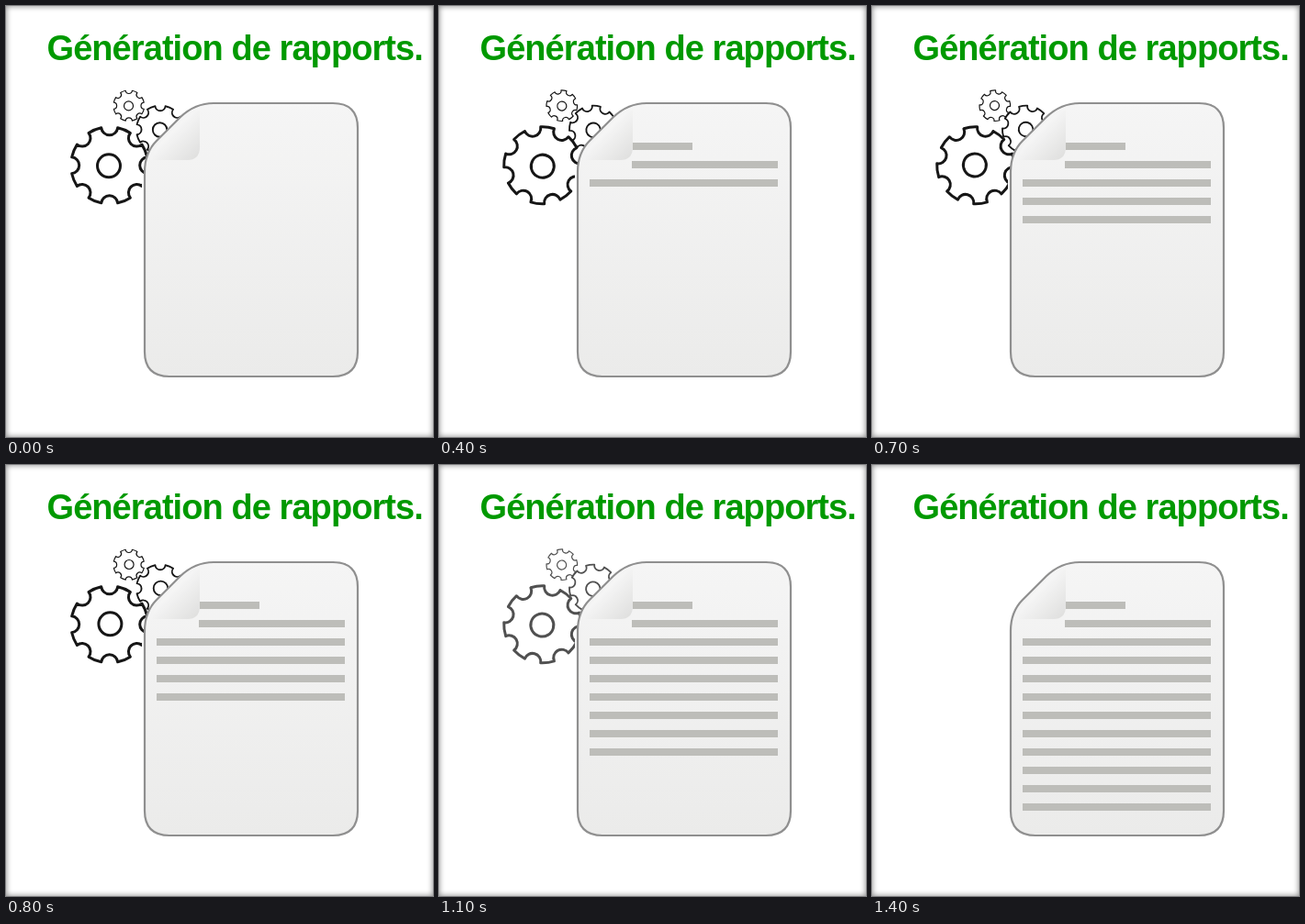
An HTML page for the animation above (1.5 s loop, 465 px wide and 470 px high).

```html
<!DOCTYPE html>
<html lang="fr">
<head>
<meta charset="utf-8">
<title>Génération de rapports</title>
<style>
html, body { margin: 0; width: 100%; height: 100%; overflow: hidden; background: #fff; }
svg { display: block; }
.edge { position: absolute; inset: 0; box-shadow: inset 0 0 6px rgba(0, 0, 0, .5); }
text { font: bold 38px "Liberation Sans", Arial, sans-serif; letter-spacing: -.93px; fill: #090; }
#gears { fill: none; stroke: #161616; stroke-width: 3; stroke-linejoin: round; }
#lines { fill: #bdbdb9; }
</style>
</head>
<body>
<svg width="465" height="470" viewBox="0 0 465 470">
  <defs>
    <linearGradient id="paper" x2="0" y2="1">
      <stop stop-color="#f5f5f5"/><stop offset="1" stop-color="#ebebea"/>
    </linearGradient>
    <linearGradient id="fold" gradientUnits="userSpaceOnUse" x1="176" y1="135" x2="208" y2="167">
      <stop stop-color="#f8f8f8"/><stop offset="1" stop-color="#dfdfde"/>
    </linearGradient>
    <g id="gear"><path id="rim"/><circle cx="-.7" cy=".5" r="12.5"/></g>
  </defs>
  <text x="44.5" y="59">Génération de rapports.</text>
  <g id="gears"></g>
  <path d="M148 184h4v34h-4z" fill="#fff"/>
  <path d="M226 106H356Q383 106 383 133V377Q383 404 356 404H178Q151 404 151 377V181Q151 160 164 147L190 121Q206 106 226 106Z"
    fill="url(#paper)" stroke="#8f8f8f" stroke-width="2.2"/>
  <path d="M211 113V154Q211 168 197 168H159Q161 156 168 149L192 125Q200 117 211 113Z" fill="url(#fold)"/>
  <g id="lines"></g>
</svg>
<div class="edge"></div>
<script>
const LOOP = 1500, STEP = 100;
const TURNS = [0, 60, 180, 240, 300, 330];
const FIRST_LINES = [0, 1, 2, 2, 3, 3];
const $ = id => document.getElementById(id);

function add(parent, tag, attrs) {
  const el = document.createElementNS("http://www.w3.org/2000/svg", tag);
  for (const key in attrs) el.setAttribute(key, attrs[key]);
  return parent.appendChild(el);
}

// Eight teeth separated by round notches
function rimPath(radius, notch) {
  const half = 2 * Math.asin(notch / (2 * radius));
  const at = a => `${(radius * Math.cos(a)).toFixed(2)} ${(radius * Math.sin(a)).toFixed(2)}`;
  let d = "";
  for (let i = 0; i < 8; i++) {
    const a = i * Math.PI / 4;
    d += `${i ? "A42 42 0 0 1" : "M"} ${at(a - half)}A${notch} ${notch} 0 0 0 ${at(a + half)}`;
  }
  return d + `A42 42 0 0 1 ${at(-half)}Z`;
}
$("rim").setAttribute("d", rimPath(42, 9));

const gears = [[112.7, 173.8, 1], [168, 134.7, .62], [133.8, 108.7, .4]].map(([x, y, size]) => ({
  el: add($("gears"), "use", { href: "#gear" }),
  place: `translate(${x} ${y}) scale(${size})`
}));

const lines = Array.from({ length: 12 }, (_, i) => {
  const x = [211, 210][i] || 164;
  return add($("lines"), "rect", { x, y: 149 + 20 * i, width: (i ? 369 : 276) - x, height: 8 });
});

function draw(now) {
  const step = Math.floor(now % LOOP / STEP);
  const count = step < 6 ? FIRST_LINES[step] : step - 2;
  lines.forEach((line, i) => line.setAttribute("visibility", i < count ? "visible" : "hidden"));
  for (const { el, place } of gears) el.setAttribute("transform", `${place} rotate(${TURNS[step % 6]})`);
  $("gears").setAttribute("opacity", Math.min(1, (14 - step) / 4));
}

const start = performance.now();
function tick() {
  draw(performance.now() - start);
  requestAnimationFrame(tick);
}
tick();
</script>
</body>
</html>
```
